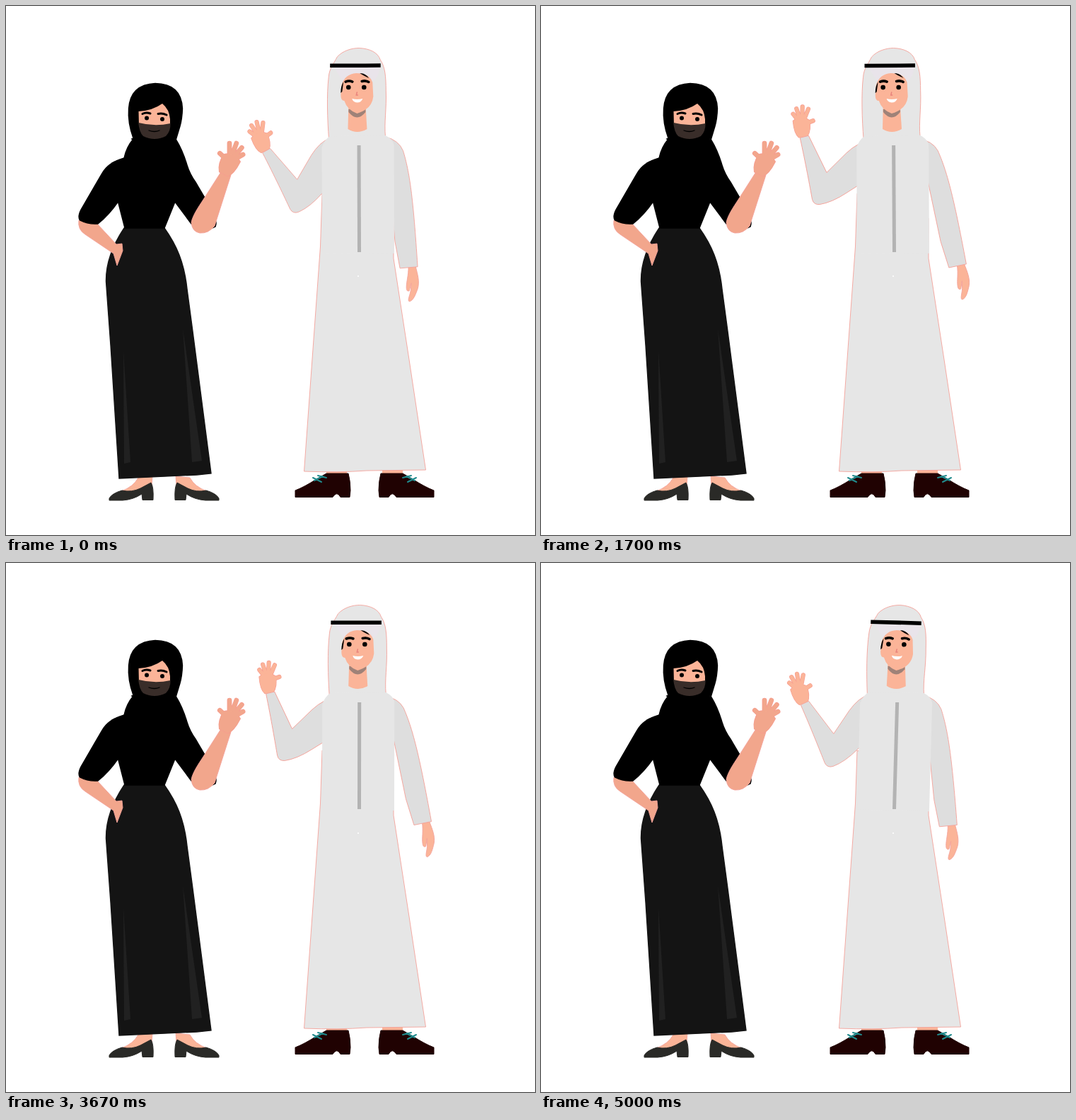
Write an HTML page that moves like this. It is 748 by 748 pixels and loops after 5030 ms.

```html
<!DOCTYPE html>
<html>
<head>
<meta charset="utf-8">
<title>Waving couple</title>
<style>
html, body { margin: 0; width: 100%; height: 100%; overflow: hidden; background: #fff; }
svg { display: block; width: 100vw; height: 100vh; }
.robe { fill: #e6e6e6; }
.sleeve { fill: #dedede; }
.rim { stroke: #f4a39b; stroke-width: .9; }
.cloth { stroke: #000; stroke-width: 1.4; }
.skin { fill: #fbb498; }
.arm { fill: #f2a68c; }
.line { fill: none; stroke: #000; stroke-linecap: round; }
</style>
</head>
<body>
<svg viewBox="0 0 748 748">
  <!-- woman: skirt and feet -->
  <g id="pump">
    <path class="skin rim" d="M187 667L207 665L206 678L180 688L163 686Q180 680 187 667Z"/>
    <path fill="#2a2a27" stroke="#2a2a27" d="M146 696Q150 689 164 685Q178 688 190 682L205 674Q209 680 208 698.500H193L192 690Q180 698 165 699H146Z"/>
  </g>
  <use href="#pump" transform="matrix(-1 0 0 1 447 0)"/>
  <path fill="#141414" stroke="#141414" stroke-width="1.400" d="M167 314H224C241 338 252 362 256 400L264 460L290 661L270 663L160 668L148 480L141.500 390C141 365 151 338 167 314Z"/>
  <path fill="#212121" d="M166 487L176 645L167 647ZM250 456L277 643L263 645Z"/>

  <!-- woman: upper body -->
  <g id="woman">
    <path class="cloth" d="M168 314L158 275L150 222Q160 217 167 215Q170 200 180 188H240Q250 204 256 225Q260 238 268 249L281 271L289 295Q300 302 296 312Q290 316 275 316L262 308L239 277L224 314Z"/>
    <path class="arm rim" d="M262 306C264 295 275 280 282 269L305 233L318 239L295 311Q286 322 274 321Q263 319 262 306Z"/>
    <g id="herHand"></g>
    <path class="cloth" d="M180 187Q172 165 173.500 145Q176 111 211 109.500Q248 110 249.500 145Q249 160 246 170Q243 180 240 190Q210 202 178 188Z"/>
    <path class="skin" d="M187.500 149Q207 148 221 138Q231 146 232 160L232 171H188Z"/>
    <path fill="#392d29" d="M187.500 165Q210 171 232.500 166Q233 177 226 184Q210 192 194 184Q188 178 187.500 165Z"/>
    <path class="line" stroke-width="3" d="M193 152.500Q198 150 204 152M215 152.500Q221 151 227 154"/>
    <path class="line" stroke-width="1.300" d="M202 176Q210 179 217 176"/>
    <circle cx="199" cy="158.500" r="3"/><circle cx="221" cy="160" r="3"/>
  </g>
  <g id="hipArm">
    <path class="arm rim" d="M103 303Q101 316 112 323L152 350L157 367L165 346L164 336L156 337L129 308Z"/>
    <path class="cloth" d="M167 216Q145 220 135 238L106 288Q101 298 104.500 303Q116 309 130 308Q146 295 159 276L175 240Z"/>
  </g>

  <!-- man: feet and robe -->
  <g id="shoe">
    <path class="skin" d="M453 655H482V664H453Z"/>
    <path fill="#200202" stroke="#200202" d="M409 694.500V685Q422 680 439 669L453 661H484Q487 672 487 685L486 694.500H473Q468 685 462 694.500Z"/>
    <path class="line" style="stroke:#208a8c" stroke-width="2" d="M434 667L446 673M441 664L453 667M436 671L448 665"/>
  </g>
  <use href="#shoe" transform="matrix(-1 0 0 1 1014 0)"/>
  <path class="robe rim" d="M447 265L444.500 340L438 430L421.500 658Q470 660 510 657L593.500 656L570 500L548 357V300Z"/>
  <circle cx="498" cy="382" r="1" fill="#fff"/>

  <!-- man: upper body -->
  <g id="man">
    <g id="waveArm">
      <g id="hisHand"></g>
      <path class="sleeve rim" d="M458 187Q444 192 432 211L412 245L374 201L363 207C380 240 394 270 402 287Q406 294 414 291Q430 284 447 265L470 240Z"/>
    </g>
    <g id="sideArm">
      <path class="skin rim" d="M569 369L579 368C582 380 585 390 582 400C579 408 576 417 570 418C567 417 571 409 572 403L573 392L570 403C567 404 566 402 566 398C566 390 569 382 569 369Z"/>
      <path class="sleeve rim" d="M537 185Q556 190 562 205C571 235 576 270 582 369L557 371L550 333L540 215Z"/>
    </g>
    <path class="robe rim" d="M457 188C455 160 454 125 457 100C458 88 464 82 469 72C477 63 490 59.500 500 59.500C515 60 527 66 530 76C537 86 538 100 538 120C539 145 535 165 537 185Z"/>
    <path class="robe" d="M447 350V200Q450 190 458 184L537 183Q547 188 549 196V350Z"/>
    <path fill="#e9e4ea" d="M465 87H529Q528 100 520 106Q500 86 478 108Z"/>
    <path class="skin" d="M485 140L484 174Q497 182 511 174L509 140Z"/>
    <path fill="#9f8278" d="M485 146H509V150Q497 165 485 150Z"/>
    <path class="skin" d="M475 112Q480 96 496 95Q515 95 519 108L520 128Q518 146 497 152Q483 147 479 134Q474 134 474 126Z"/>
    <path d="M478 107Q474 113 474 123L476 121ZM501 95Q509 95 514 102Q507 99 501 95Z"/>
    <path class="line" stroke-width="3.600" d="M481 107Q486 105 490.500 107M504 106.500Q509 105 513.500 107.500"/>
    <path class="line" style="stroke:#e8837c" stroke-width="1.500" d="M497 122L496 126H498"/>
    <path fill="#fff" d="M490 131Q497 133 505 131Q503 136.500 497 136.500Q491 136 490 131Z"/>
    <g id="eyes"><circle cx="485" cy="115" r="3.300"/><circle cx="507" cy="115" r="3.300"/></g>
    <path class="line" style="stroke-linecap:butt" stroke-width="5.500" d="M459 84.200H530.500"/>
    <path class="line" style="stroke:#b3b3b3;stroke-linecap:butt" stroke-width="5" d="M499.500 197V348"/>
  </g>
</svg>
<script>
const LOOP = 5030, BEAT = 1740, SWAY = 905;
const WAVES = [430, 1740, 3700, 4785];
const el = id => document.getElementById(id);
const turn = (id, deg, x, y) => el(id).setAttribute('transform', `rotate(${deg} ${x} ${y})`);

// Smooth hump: 1 at distance 0, 0 from the given width on.
const bump = (distance, width) =>
  Math.cos(Math.PI / 2 * Math.min(1, Math.abs(distance) / width)) ** 2;

// Four fanned fingers and a thumb around a palm; side -1 mirrors the hand.
function hand(id, color, x, y, axis, side, size) {
  const ray = (deg, length) => {
    const a = deg * Math.PI / 180;
    return `M0 0L${length * Math.sin(a)} ${-length * Math.cos(a)}`;
  };
  let fingers = ray(74, 17);
  for (let i = 0; i < 4; i++) fingers += ray(20 * i - 33, 26 - 1.5 * (i - 2) ** 2);
  const layer = (c, extra) =>
    `<path class="line" style="stroke:${c}" stroke-width="${5 + extra}" d="${fingers}"/>` +
    `<path fill="${c}" stroke="${c}" stroke-width="${extra}" d="M-12 -7Q-12 11 -6 17H6Q13 8 11 -6Q0 -15 -12 -7Z"/>`;
  el(id).innerHTML = layer('#f79a90', 1.2) + layer(color, 0);
  el(id).setAttribute('transform', `translate(${x} ${y}) rotate(${axis}) scale(${side * size} ${size})`);
}
hand('herHand', '#f2a68c', 316, 221, 27, -1, 1.1);
hand('hisHand', '#fbb498', 361, 189, -20, 1, 1);

function draw() {
  const t = performance.now() % LOOP;
  const beat = t / BEAT % 1;
  const lean = -3.75 * bump(beat - .563, .247);
  const sway = .75 - 1.1 * Math.cos(2 * Math.PI * (t / SWAY + .09));
  const wave = Math.max(...WAVES.map(peak => bump(t - peak, 360)));
  const open = Math.min(1, Math.max(0, Math.abs(beat - .595) * 25 - .4));

  turn('woman', lean, 195, 315);
  turn('hipArm', lean * .4, 195, 315);
  turn('man', sway, 500, 348);
  turn('waveArm', 16 * wave ** 2, 446, 212);
  turn('sideArm', -7 * wave, 562, 205);
  el('eyes').setAttribute('transform', `translate(0 ${115 * (1 - open)}) scale(1 ${open})`);
  requestAnimationFrame(draw);
}
draw();
</script>
</body>
</html>
```
